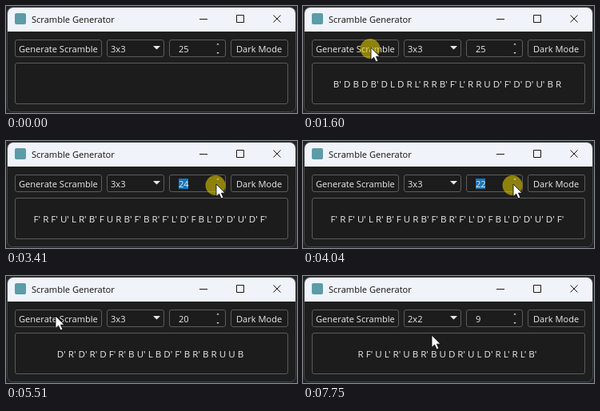
Write an HTML page that moves like this. It is 364 px wide and 134 px high and loops after 8 s.

```html
<!DOCTYPE html>
<html lang="en">
<head>
<meta charset="utf-8">
<title>Scramble Generator</title>
<style>
html, body { margin: 0; width: 364px; height: 134px; overflow: hidden; background: #20222b; }
svg { display: block; }
text { font: 11.1px "Open Sans", "Noto Sans", sans-serif; fill: #ececec; white-space: pre; }
.title { fill: #111; }
#moves { font-size: 11.6px; text-anchor: middle; }
.box { fill: #1c1c1c; stroke: #5c5c5c; }
.line { fill: none; stroke: #1a1a1a; }
.arrow { fill: #e6e6e6; }
</style>
</head>
<body>
<svg width="364" height="134" viewBox="0 0 364 134">
  <rect x="1.5" y="1.5" width="361" height="131" rx="7" fill="#1e1e1e" stroke="#45464c"/>
  <path d="M2 32V9a7 7 0 0 1 7-7H355a7 7 0 0 1 7 7V32Z" fill="#f0f3f9"/>
  <rect x="11" y="9" width="14" height="14" rx="2" fill="#5b9ca6"/>
  <text class="title" x="32" y="20.5">Scramble Generator</text>
  <path class="line" d="M242 16.5h10M288.5 11.5h9v9h-9ZM334.5 11.5l9 9M343.5 11.5l-9 9"/>

  <g id="boxes"></g>
  <path class="arrow" d="M184 50h9l-4.5 4.5ZM263.5 48.5h3l-1.5-2ZM263.5 58h3l-1.5 2Z"/>

  <text x="16" y="57.5">Generate Scramble</text>
  <text id="cube" x="131" y="57.5"></text>
  <rect id="mark" x="216" y="47" width="12" height="13" fill="#1676b8"/>
  <text id="count" x="216" y="57.5"></text>
  <text x="288" y="57.5">Dark Mode</text>
  <text id="moves" x="180.5" y="101.5"></text>

  <circle id="press" r="12.5" fill="#e6d000" fill-opacity=".57"/>
  <path id="pointer" d="M0 0V15.5L3.6 12.2L6.2 18L9 16.8L6.4 11.2H11Z" fill="#fff" stroke="#000" stroke-width=".8"/>
</svg>
<script>
const LOOP = 8000, HOLD = 110;
const $ = id => document.getElementById(id);

const button = { x: 85, y: 52 }, spinner = { x: 263, y: 54 };
const combo = { x: 178, y: 55 }, item = { x: 161, y: 74 };

const trips = [
  { from: 270, to: 550, end: button },
  { from: 2280, to: 2990, end: spinner },
  { from: 4390, to: 5160, end: { x: 62, y: 50 } },
  { from: 6080, to: 6500, end: combo },
  { from: 6830, to: 7120, end: item }
];

const scrambles = [
  "",
  "B' D B D B' D L D R L' R R B' F' L' R R U D' F' D' D' U' B R",
  "F' R F' U' L R' B' F U R B' F' B R' F' L' D' F B L' D' D' U' D' F'",
  "D' R' D' R' D F' R' B U' L B D' F' B R' B R U U B",
  "R F' U L' R' U B R' B U D R' U L D' R L' R L' B'"
];

const generate = [880, 1600, 5300, 5890];
const lower = Array.from({ length: 5 }, (_, i) => 3130 + 280 * i);
const pick = [6710, 7140];
const clicks = [...generate, ...lower, ...pick];

const done = (list, t) => list.filter(c => t >= c + HOLD).length;
const ease = u => u * u * (3 - 2 * u);

function pointerAt(t) {
  let p = { x: 118, y: 122 };
  for (const { from, to, end } of trips) {
    const u = ease(Math.min(1, Math.max(0, (t - from) / (to - from))));
    p = { x: p.x + (end.x - p.x) * u, y: p.y + (end.y - p.y) * u };
  }
  return p;
}

function drawBox(x, y, w, h) {
  const box = document.createElementNS("http://www.w3.org/2000/svg", "rect");
  Object.entries({ class: "box", x: x + .5, y: y + .5, width: w, height: h, rx: 2.5 })
    .forEach(([key, value]) => box.setAttribute(key, value));
  $("boxes").append(box);
}

function setText(id, value) {
  if ($(id).textContent !== value) $(id).textContent = value;
}

const show = (id, on) => $(id).style.display = on ? "" : "none";
const place = (id, x, y) => $(id).setAttribute("transform", `translate(${x} ${y})`);

function draw(t) {
  const small = done(pick, t) === pick.length;
  setText("moves", scrambles[done(generate, t)]);
  setText("cube", small ? "2x2" : "3x3");
  setText("count", String(small ? 9 : 25 - done(lower, t)));
  show("mark", t >= lower[0] && t < generate[2]);

  const { x, y } = pointerAt(t);
  show("pointer", t >= trips[0].from);
  show("press", clicks.some(c => t >= c && t < c + HOLD));
  place("pointer", x, y);
  place("press", x - 1, y + 1.5);
}

drawBox(11, 42, 108, 21);
drawBox(126, 42, 71, 21);
drawBox(204, 42, 70, 21);
drawBox(281, 42, 71, 21);
drawBox(11, 71, 341, 51);

const start = performance.now();
function tick() {
  draw((performance.now() - start) % LOOP);
  requestAnimationFrame(tick);
}
tick();
</script>
</body>
</html>
```
